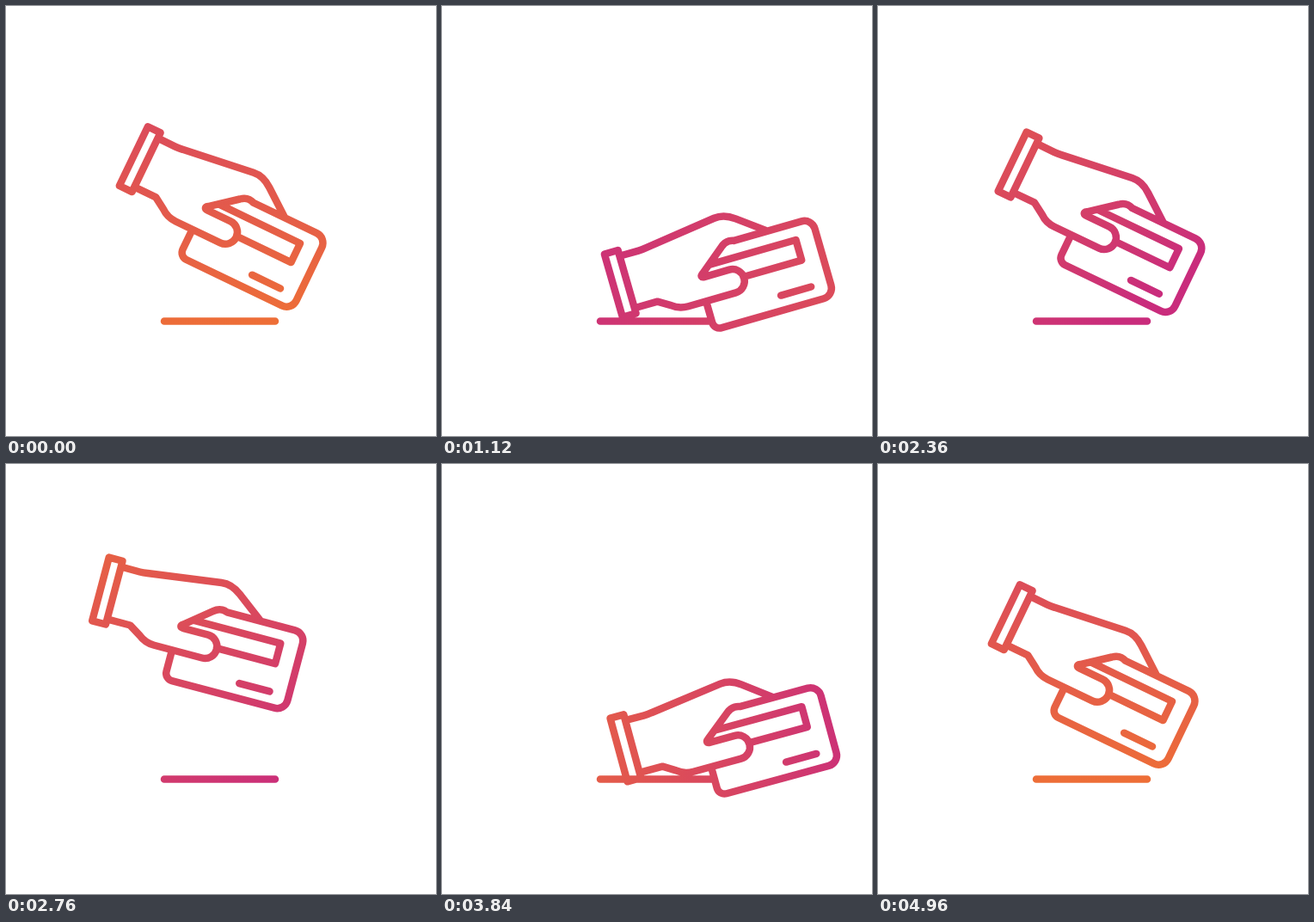
Recreate the animation shown at these times as an HTML page with a canvas. Size 500 px wide and 500 px high, loop 5000 ms.

```html
<!DOCTYPE html>
<html lang="en">
<head>
<meta charset="utf-8">
<title>Card payment</title>
<style>
  html, body { margin: 0; width: 100%; height: 100%; overflow: hidden; background: #fff; }
  canvas { display: block; width: 500px; height: 500px; }
</style>
</head>
<body>
<canvas id="stage" width="500" height="500"></canvas>
<script>
const ctx = document.getElementById('stage').getContext('2d');
const LOOP = 5000, SWING = 2500, STEP = 40;
const PIVOT = { x: 122, y: 58 };
const REST = { x: 249.7, y: 245.4, angle: 25.7 };

const icon = new Path2D([
  'M0 0H16.3V76.3H0Z',                                              // cuff
  'M16.3 7L39 7.2Q43 7.2 48 6.4L134 -5Q146 -6.6 158 2.5L189 26',     // back of hand
  'M16.3 70H44L58 78.7Q66 85.3 77 85.3H134.5a13.9 13.9 0 0 0 0 -27.8H105',
  'C100.5 57.5 100.3 55.3 103.5 53.2L133 29.5Q138 25.2 143 25.3Q146 25.4 149 26.5', // thumb and finger
  'H230.8a12.5 12.5 0 0 1 12.5 12.5V107.5a12.5 12.5 0 0 1 -12.5 12.5',
  'H107.5a9 9 0 0 1 -9 -9V87',                                      // card
  'M113.5 45.5H218.5V70H148M184 102.8H220.5'
].join(''));
const ground = new Path2D('M184 366.5H313');

// Eased progress from 0 to 1 between two times
function ease(time, from, to) {
  const u = Math.min(1, Math.max(0, (time - from) / (to - from)));
  return u * u * (3 - 2 * u);
}

// Overlapping eased moves that add up to a closed path
function poseAt(time) {
  const t = time % SWING;
  const lift = ease(t, 0, 380), drop = ease(t, 684, 1200);
  const swipe = ease(t, 1319, 1835), back = ease(t, 1720, 2180);
  const rise = ease(t, 1628, 2050), settle = ease(t, 1900, 2330);
  const turn = ease(t, 1155, 2380);
  // The first swing dips a little deeper than the second
  const dip = 1 - ease(Math.abs(time - 2450), 0, 300);
  return {
    x: REST.x - 35.2 * lift + 115.1 * drop - 225.7 * swipe + 145.8 * back + 10 * dip,
    y: REST.y - 64.8 * lift + 139 * drop - 116 * rise + 41.8 * settle + 8 * dip,
    angle: REST.angle - 14.2 * lift - 29.4 * drop + 43.6 * turn
  };
}

// A colour ramp that turns once per loop while its level sways
function gradientAt(time) {
  const a = 2 * Math.PI * time / LOOP, sin = Math.sin(a), cos = Math.cos(a);
  const level = .63 + .17 * sin - .19 * cos - .08 * Math.cos(2 * a);
  const gx = (.05 - .14 * sin - .07 * cos - .08 * Math.sin(2 * a)) / 100;
  const gy = -.17 * cos / 100;
  const scale = 1 / (gx * gx + gy * gy);
  const at = v => [250 + (v - level) * gx * scale, 250 + (v - level) * gy * scale];
  const gradient = ctx.createLinearGradient(...at(0), ...at(1));
  ['#f47b2a', '#de5055', '#c92c7c'].forEach((color, i) => gradient.addColorStop(i / 2, color));
  return gradient;
}

function draw(time) {
  const { x, y, angle } = poseAt(time);
  const shape = new Path2D(ground);
  shape.addPath(icon, new DOMMatrix().translate(x, y).rotate(angle).translate(-PIVOT.x, -PIVOT.y));

  ctx.fillStyle = '#fff';
  ctx.fillRect(0, 0, 500, 500);
  ctx.lineWidth = 8.5;
  ctx.lineCap = ctx.lineJoin = 'round';
  ctx.strokeStyle = gradientAt(time);
  ctx.stroke(shape);
}

const start = performance.now();
function tick() {
  const time = (performance.now() - start) % LOOP;
  draw(Math.floor(time / STEP) * STEP);
  requestAnimationFrame(tick);
}
tick();
</script>
</body>
</html>
```
